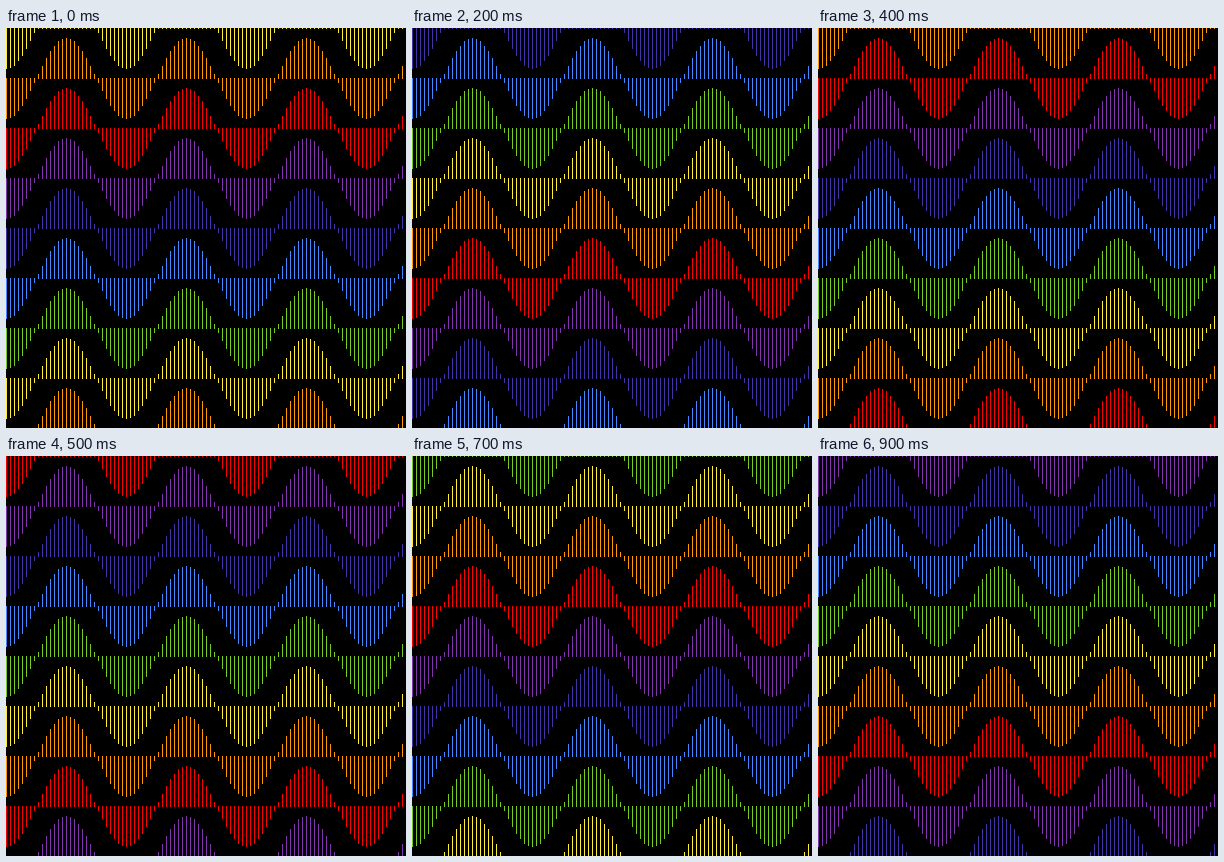
These frames come from a looping animation (400 by 400 pixels, 1 s). An HTML page with a canvas:

```html
<!DOCTYPE html>
<html lang="en">
<head>
<meta charset="utf-8">
<title>Rainbow waves</title>
<style>
  html, body { margin: 0; width: 100%; height: 100%; overflow: hidden; background: #000; }
  canvas { display: block; width: 400px; height: 400px; }
</style>
</head>
<body>
<canvas id="stage" width="400" height="400"></canvas>
<script>
const SIZE = 400, GAP = 4, ROW = 50, AMP = 40, PERIOD = 120;
const LOOP = 1000, STEPS = 10, TRAVEL = 17;
const COLORS = ['#ff9900', '#ff0000', '#8033aa', '#4433a6', '#4488ff', '#77cc22', '#ffee33'];
const START = 6;
const ctx = document.getElementById('stage').getContext('2d');

function drawRow(y, color) {
  ctx.fillStyle = color;
  for (let x = 0; x < SIZE; x += GAP) {
    const h = Math.round(AMP * Math.cos(2 * Math.PI * x / PERIOD));
    ctx.fillRect(x, y + Math.min(h, 0), 1, Math.abs(h) + 1);
  }
}

function draw(step) {
  // Colours climb about two rows per step, in whole rows.
  const shift = START + Math.round(step * TRAVEL / (STEPS - 1));
  ctx.fillStyle = '#000';
  ctx.fillRect(0, 0, SIZE, SIZE);
  for (let row = 0; row * ROW <= SIZE; row++) {
    drawRow(row * ROW, COLORS[(row + shift) % COLORS.length]);
  }
}

const origin = performance.now();
let shown = 0;

function tick() {
  const time = (performance.now() - origin) % LOOP;
  const step = Math.floor(time / LOOP * STEPS);
  if (step !== shown) draw(shown = step);
  requestAnimationFrame(tick);
}

draw(shown);
requestAnimationFrame(tick);
</script>
</body>
</html>
```
